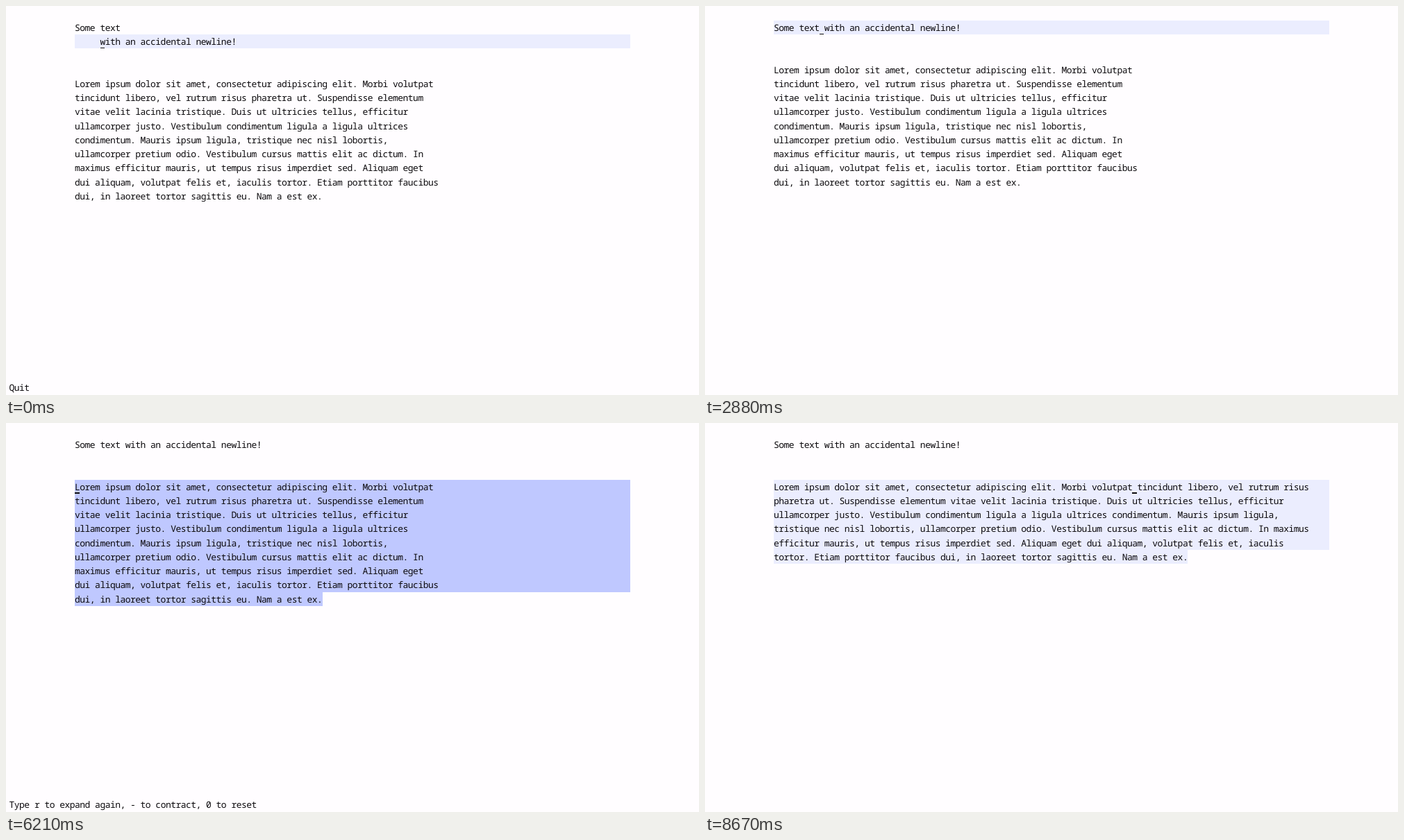
An HTML page for the animation above (9 s loop, 998 by 561 pixels).

```html
<!DOCTYPE html>
<html lang="en">
<head>
<meta charset="utf-8">
<title>Joining lines in an editor</title>
<style>
  html, body { margin: 0; width: 100%; height: 100%; overflow: hidden; background: #fffdff; }
  #stage {
    position: relative; width: 998px; height: 561px; overflow: hidden;
    font: 13px/20.25px "Noto Sans Mono", "DejaVu Sans Mono", monospace;
    color: #0c0a0d; text-rendering: geometricPrecision; font-kerning: none;
  }
  #stage > * { position: absolute; height: 20.25px; white-space: pre; }
  .line { background: #ebedfe; }
  .region { background: #bfc8ff; }
  .pick { background: #e0dfe1; }
  .doc { font-style: italic; color: #2b3a68; }
  .strong { font-weight: bold; }
  .match { color: #1d2f9f; }
  .prompt { color: #47547f; }
  #stage > .cursor { height: 1.5px; background: #0c0a0d; }
</style>
</head>
<body>
<div id="stage"></div>
<script>
const LOOP = 9000, CELL = 7.27, ROW = 20.25;
const TEXT_X = 99.3, TEXT_Y = 20.9, MINI_X = 4.8, MINI_Y = 540.3;
const TEXT_W = 110 * CELL, MINI_W = 988.2, DOC_COL = 42;

const PARA = "Lorem ipsum dolor sit amet, consectetur adipiscing elit. Morbi volutpat tincidunt libero, vel rutrum risus pharetra ut. Suspendisse elementum vitae velit lacinia tristique. Duis ut ultricies tellus, efficitur ullamcorper justo. Vestibulum condimentum ligula a ligula ultrices condimentum. Mauris ipsum ligula, tristique nec nisl lobortis, ullamcorper pretium odio. Vestibulum cursus mattis elit ac dictum. In maximus efficitur mauris, ut tempus risus imperdiet sed. Aliquam eget dui aliquam, volutpat felis et, iaculis tortor. Etiam porttitor faucibus dui, in laoreet tortor sagittis eu. Nam a est ex.";

const COMMANDS = [
  ["slot/lsp-shutdown-last-workspaces", "Shut down the ‘lsp--last-active-workspaces’."],
  ["find-library", "Find the Emacs Lisp source of LIBRARY."],
  ["garbage-collect", "Reclaim storage for Lisp objects no longer needed."],
  ["lsp-semantic-tokens-mode", "Toggle semantic-tokens support."],
  ["org-agenda", "Dispatch agenda commands to collect entries to the agenda buffer."],
  ["save-buffers-kill-emacs", "Offer to save each buffer, then kill this Emacs process."],
  ["markdown-mode", "Major mode for editing Markdown files."],
  ["set-fill-column", "Set ‘fill-column’ to specified argument."],
  ["jinx-mode", "Enchanted Spell Checker."],
  ["join-line", "Join this line to previous and fix up whitespace at join."],
];

function wrap(text, limit) {
  const lines = [""];
  for (const word of text.split(" ")) {
    const last = lines[lines.length - 1];
    if (!last) lines[lines.length - 1] = word;
    else if (last.length + 1 + word.length <= limit) lines[lines.length - 1] += " " + word;
    else lines.push(word);
  }
  return lines;
}

const hard = wrap(PARA, 72), soft = wrap(PARA, 108);
const joined = "Some text with an accidental newline!";
const BODIES = {
  split: { head: ["Some text", "     with an accidental newline!", "", ""], para: hard },
  joined: { head: [joined, "", ""], para: hard },
  unfilled: { head: [joined, "", ""], para: soft },
};

// Each step changes part of the editor state; the rest carries over.
const typing = (open, keys) => [
  [open, { typed: "", echo: "" }],
  ...keys.map((t, i) => [t, { typed: "join".slice(0, i + 1), narrow: i === 3 }]),
];
const STEPS = [
  [0, { body: "split", line: 1, cursor: [5, 1], region: "", echo: "Quit", typed: null, narrow: false }],
  ...typing(1130, [1740, 1830, 1910, 2000]),
  [2400, { body: "joined", line: 0, cursor: [9, 0], typed: null, narrow: false }],
  [4000, { line: 1, cursor: [5, 1] }],
  [4380, { line: 2, cursor: [0, 2] }],
  [4540, { line: 3, cursor: [9, 3] }],
  [5080, { region: "word", cursor: [6, 3], echo: "Type r to expand again, - to contract, 0 to reset" }],
  [5290, { region: "sentence", cursor: [0, 3] }],
  [5710, { region: "para" }],
  ...typing(7210, [7700, 7790, 7870, 7960]),
  [8300, { body: "unfilled", region: "", line: "para", cursor: [71, 3], typed: null, narrow: false }],
];
let carry = {};
const scenes = STEPS.map(([at, change]) => ({ at, ...(carry = { ...carry, ...change }) }));

const stage = document.getElementById("stage");

function add(kind, x, y, width, text = "") {
  const el = document.createElement("div");
  el.className = kind;
  el.style.left = x + "px";
  el.style.top = y + "px";
  if (width) el.style.width = width + "px";
  el.textContent = text;
  stage.append(el);
  return el;
}

const rowY = row => TEXT_Y + row * ROW;
const colX = col => TEXT_X + col * CELL;

// Centre glyphs in their cells by measuring the font's own advance.
const probe = add("", 0, 0, 0, "0".repeat(100));
const tracking = CELL - probe.getBoundingClientRect().width / 100;
stage.style.letterSpacing = tracking + "px";

const write = (kind, x, y, text) => add(kind, x + tracking / 2, y, 0, text);
const mark = (kind, row, col, count) => add(kind, colX(col), rowY(row), count * CELL);

function markPara(kind, top, lines) {
  lines.forEach((text, i) => {
    const width = i < lines.length - 1 ? TEXT_W : text.length * CELL;
    add(kind, TEXT_X, rowY(top + i), width);
  });
}

function drawBuffer(s) {
  const { head, para } = BODIES[s.body];
  const top = head.length;
  if (s.line === "para") markPara("line", top, para);
  else mark("line", s.line, 0, 110);
  if (s.region === "word") mark("region", top, 6, 5);
  if (s.region === "sentence") mark("region", top, 0, 56);
  if (s.region === "para") markPara("region", top, para);
  [...head, ...para].forEach((text, i) => text && write("", TEXT_X, rowY(i), text));
}

function drawCursor(x, y) {
  add("cursor", x, y + ROW - 1.5, CELL - 0.5);
}

function drawMenu(s) {
  const list = s.narrow ? COMMANDS.slice(-1) : COMMANDS;
  add("pick", MINI_X, MINI_Y - ROW, MINI_W);
  list.forEach(([name, doc], i) => {
    const left = list.length - i;
    const y = MINI_Y - left * ROW;
    const weight = left === 1 ? " strong" : "";
    const label = write(weight, MINI_X, y, name);
    if (s.narrow) {
      const match = document.createElement("span");
      match.className = "match";
      match.textContent = s.typed;
      label.replaceChildren(match, name.slice(s.typed.length));
    }
    write("doc" + weight, MINI_X + DOC_COL * CELL, y, doc);
  });
  write("prompt", MINI_X, MINI_Y, (s.narrow ? "1/1" : "1/5211").padEnd(7) + "M-x");
  write("", MINI_X + 11 * CELL, MINI_Y, s.typed);
  drawCursor(MINI_X + (11 + s.typed.length) * CELL, MINI_Y);
}

function draw(s) {
  stage.replaceChildren();
  drawBuffer(s);
  if (s.typed !== null) drawMenu(s);
  else {
    drawCursor(colX(s.cursor[0]), rowY(s.cursor[1]));
    if (s.echo) write("", MINI_X, MINI_Y, s.echo);
  }
}

const start = performance.now();
let shown = null;
function tick() {
  const t = (performance.now() - start) % LOOP;
  const scene = scenes.filter(s => s.at <= t).pop();
  if (scene !== shown) draw(shown = scene);
  requestAnimationFrame(tick);
}
tick();
</script>
</body>
</html>
```
